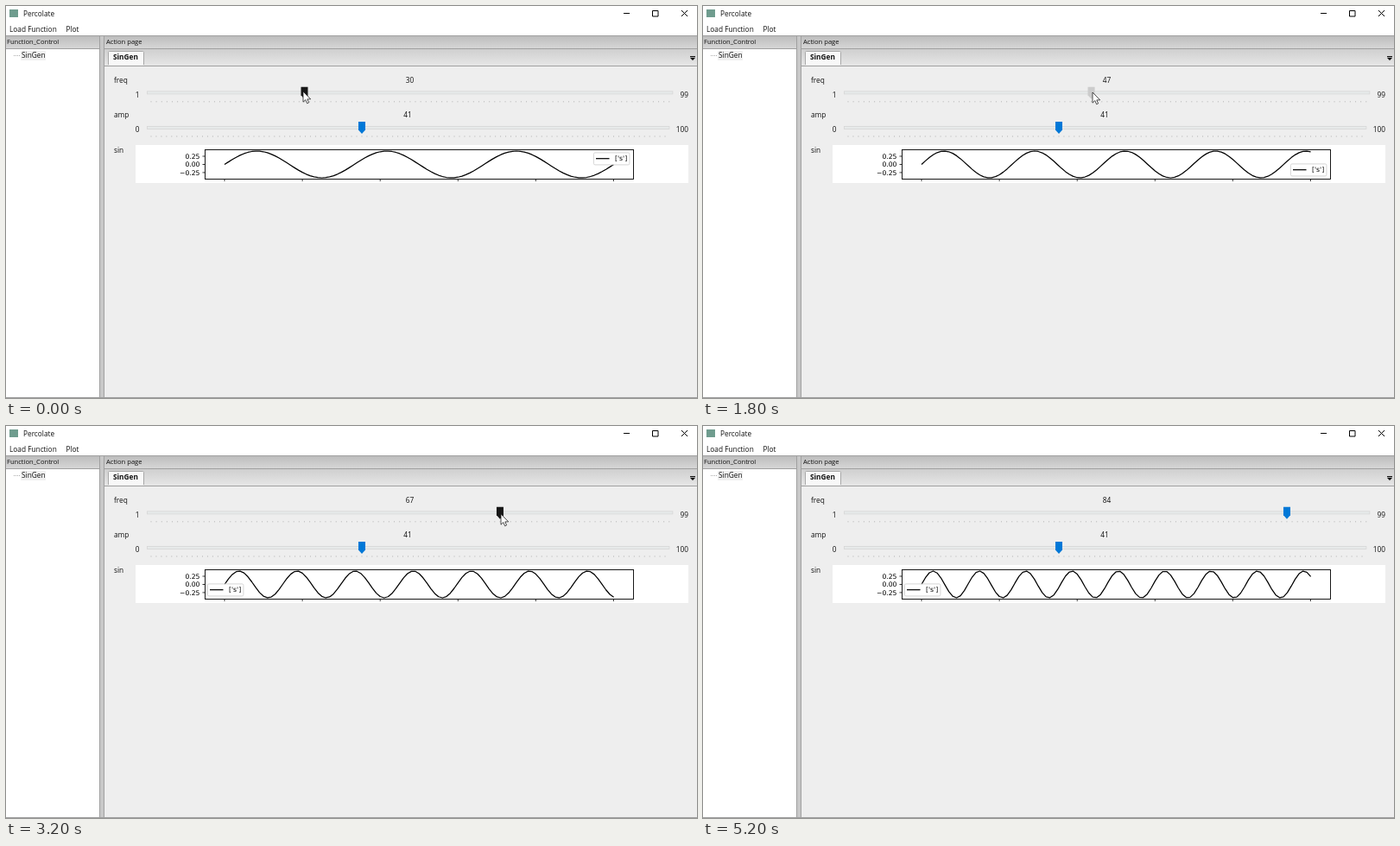
Recreate the animation shown at these times as an HTML page. Size 800 by 454 pixels, loop 6.8 s.

```html
<!DOCTYPE html>
<html lang="en">
<head>
<meta charset="utf-8">
<title>Percolate</title>
<style>
  html, body { margin: 0; height: 100%; overflow: hidden; background: #fff; }
  svg { display: block; width: 100%; height: 100%; }
  text { font: 8.3px "Open Sans", "Noto Sans", sans-serif; fill: #111; white-space: pre; }
  .caption { font-size: 7.6px; }
  .bold { font-weight: 700; }
  .plot text { font: 7.7px "DejaVu Sans", sans-serif; fill: #000; }
  .mid { text-anchor: middle; }
  .end { text-anchor: end; }
  .line { fill: none; stroke: #000; }
</style>
</head>
<body>
<svg viewBox="0 0 800 454">
  <defs>
    <linearGradient id="captionFill" x2="0" y2="1">
      <stop stop-color="#bdbdbd"/><stop offset="1" stop-color="#d6d6d6"/>
    </linearGradient>
    <linearGradient id="stripFill" x2="0" y2="1">
      <stop stop-color="#cfcfcf"/><stop offset="1" stop-color="#e6e6e6"/>
    </linearGradient>
    <path id="thumb" d="M-4 0h8v9.5l-4 4.5l-4-4.5z"/>
  </defs>

  <!-- title bar and menu -->
  <rect width="800" height="454" fill="#fff"/>
  <rect x="4" y="4" width="10" height="9" fill="#6f9c8e"/>
  <text x="20" y="11.5">Percolate</text>
  <path class="line" d="M715 8.5h7M748.5 5.5h6.5v6.5h-6.5zM782 5l7 7M789 5l-7 7"/>
  <text x="4" y="30">Load Function</text>
  <text x="69.5" y="30">Plot</text>

  <!-- panes -->
  <rect y="34" width="800" height="420" fill="#c8c8c8"/>
  <rect y="35" width="109" height="14" fill="url(#captionFill)"/>
  <rect x="114" y="35" width="686" height="14" fill="url(#captionFill)"/>
  <text class="caption" x="1" y="44.3">Function_Control</text>
  <text class="caption" x="116" y="44.3">Action page</text>
  <rect y="49.5" width="108.5" height="404" fill="#fff"/>
  <path d="M0 34.5h800M0 49.5h109M108.5 35v419M113.5 35v419M114 49.5h686M0 453.5h800" stroke="#a0a0a0" fill="none"/>
  <path d="M9 57.5h8" stroke="#aaa" stroke-dasharray="1 1"/>
  <rect x="17" y="52" width="29" height="11" fill="#f0f0f0"/>
  <text x="18" y="60">SinGen</text>

  <!-- notebook -->
  <rect x="114" y="50" width="686" height="19" fill="url(#stripFill)"/>
  <rect x="114" y="69" width="686" height="384" fill="#eee"/>
  <path d="M114 69.5h686" stroke="#a0a0a0"/>
  <path d="M118.5 68V53.5q0-1 1-1h39q1 0 1 1V68" fill="#f8f8f8" stroke="#a8a8a8"/>
  <rect x="119" y="67" width="40" height="2" fill="#f4f4f4"/>
  <text class="bold" x="124" y="62">SinGen</text>
  <path d="M792 58h6v1.2h-6zM792 60h6l-3 3z" fill="#111"/>

  <!-- sliders -->
  <text x="125" y="89">freq</text>
  <text x="125" y="129.3">amp</text>
  <text x="125" y="169.7">sin</text>
  <text id="freqText" class="mid" x="467.4" y="89"></text>
  <text class="mid" x="465" y="129.3">41</text>
  <text x="149.7" y="105.8">1</text>
  <text class="end" x="790" y="105.8">99</text>
  <text x="149.7" y="146">0</text>
  <text class="end" x="790" y="146">100</text>
  <g fill="#e7eaea" stroke="#d6d6d6" stroke-width=".8">
    <rect x="163.4" y="98.9" width="608.5" height="3"/>
    <rect x="163.4" y="139.4" width="604.5" height="3"/>
  </g>
  <g stroke="#c4c4c4" stroke-width="1.6">
    <path d="M167.5 110.7H769" stroke-dasharray="1 5.12"/>
    <path d="M167.5 151H764" stroke-dasharray="1 4.95"/>
  </g>
  <use href="#thumb" x="412" y="134" fill="#0078d7"/>
  <use id="freqThumb" href="#thumb" y="93.7"/>

  <!-- plot -->
  <rect x="150" y="161" width="640" height="44" fill="#fff"/>
  <g class="plot">
    <text class="end" x="224.5" y="176.8">0.25</text>
    <text class="end" x="224.5" y="186.3">0.00</text>
    <text class="end" x="224.5" y="195.6">−0.25</text>
    <path class="line" stroke-width=".8" d="M227.5 174h3m-3 9.5h3m-3 9.4h3M253 200.5v2.6m90.1-2.6v2.6m90.1-2.6v2.6m90.1-2.6v2.6m90.1-2.6v2.6m90.1-2.6v2.6"/>
    <path id="curve" class="line" stroke-width="1.25" stroke-linejoin="round"/>
    <rect class="line" x="230.5" y="166.5" width="496" height="34" stroke-width=".9"/>
    <g id="legend">
      <rect x=".4" y=".4" width="41.5" height="14" rx="1.6" fill="#fff" fill-opacity=".8" stroke="#ccc" stroke-width=".8"/>
      <path class="line" stroke-width="1.25" d="M3 7.2h15.5"/>
      <text x="25" y="9.8">['s']</text>
    </g>
  </g>

  <path id="cursor" d="M0 0v12.2l2.8-2.6l1.8 4.2l2-.9l-1.8-4h3.9z" fill="#fff" stroke="#222" stroke-width=".8"/>
</svg>
<script>
const LOOP = 6800, STEP = 200;
const freqs = [30, 31, 32, 34, 36, 37, 39, 41, 43, 47, 50, 53, 56, 59,
               62, 64, 67, 70, 72, 75, 76, 78, 81, 83, 84, 84, 84];
const lastStep = freqs.length - 1;
// step, x, y of the pointer tip
const pointer = [[0, 344, 99], [5, 391, 102], [9, 451, 100], [13, 525, 100],
                 [16, 573, 102], [19, 618, 103], [24, 676, 99], [25, 467, 55]];
const legendSize = [42, 15];
const [left, middle, right] = [233, 457, 680];
const [upper, center, lower] = [169.5, 176, 182.5];
// in order of preference
const legendSpots = [[right, upper], [left, upper], [left, lower], [right, lower], [right, center],
                     [left, center], [middle, lower], [middle, upper], [middle, center]];
const el = id => document.getElementById(id);

function sinePoints(freq) {
  return Array.from({ length: 101 }, (_, i) =>
    [253 + 4.506 * i, 183.5 - 15.5 * Math.sin(2 * Math.PI * freq / 10 * i / 100)]);
}

// The legend goes where it covers the fewest points of the curve.
function bestSpot(points) {
  const covered = ([x, y]) => points.filter(([px, py]) =>
    px > x && px < x + legendSize[0] && py > y && py < y + legendSize[1]).length;
  return legendSpots.reduce((best, spot) => covered(spot) < covered(best) ? spot : best);
}

function pointerAt(step) {
  const next = pointer.findIndex(key => key[0] >= step);
  const b = pointer[next], a = pointer[Math.max(0, next - 1)];
  const k = b === a ? 0 : (step - a[0]) / (b[0] - a[0]);
  return [1, 2].map(i => a[i] + (b[i] - a[i]) * k);
}

function draw(step) {
  const freq = freqs[step];
  const pressed = step >= 2 && step <= 10;
  // While the thumb is pressed the plot trails by one step.
  const points = sinePoints(pressed ? freqs[step - 1] : freq);

  el("freqText").textContent = freq;
  el("freqThumb").setAttribute("x", 345.5 + 6.12 * (freq - 30));
  el("freqThumb").setAttribute("fill", step > 24 ? "#0078d7" : pressed ? "#ccc" : "#171717");
  el("curve").setAttribute("d", "M" + points.map(p => p.map(v => v.toFixed(2))).join("L"));
  el("legend").setAttribute("transform", `translate(${bestSpot(points)})`);

  const visible = step < lastStep;
  el("cursor").style.display = visible ? "" : "none";
  if (visible) el("cursor").setAttribute("transform", `translate(${pointerAt(step)})`);
}

let shown = -1;
const start = performance.now();
function tick() {
  const time = (performance.now() - start) % LOOP;
  const step = Math.min(lastStep, Math.floor(time / STEP));
  if (step !== shown) draw(shown = step);
  requestAnimationFrame(tick);
}
tick();
</script>
</body>
</html>
```
